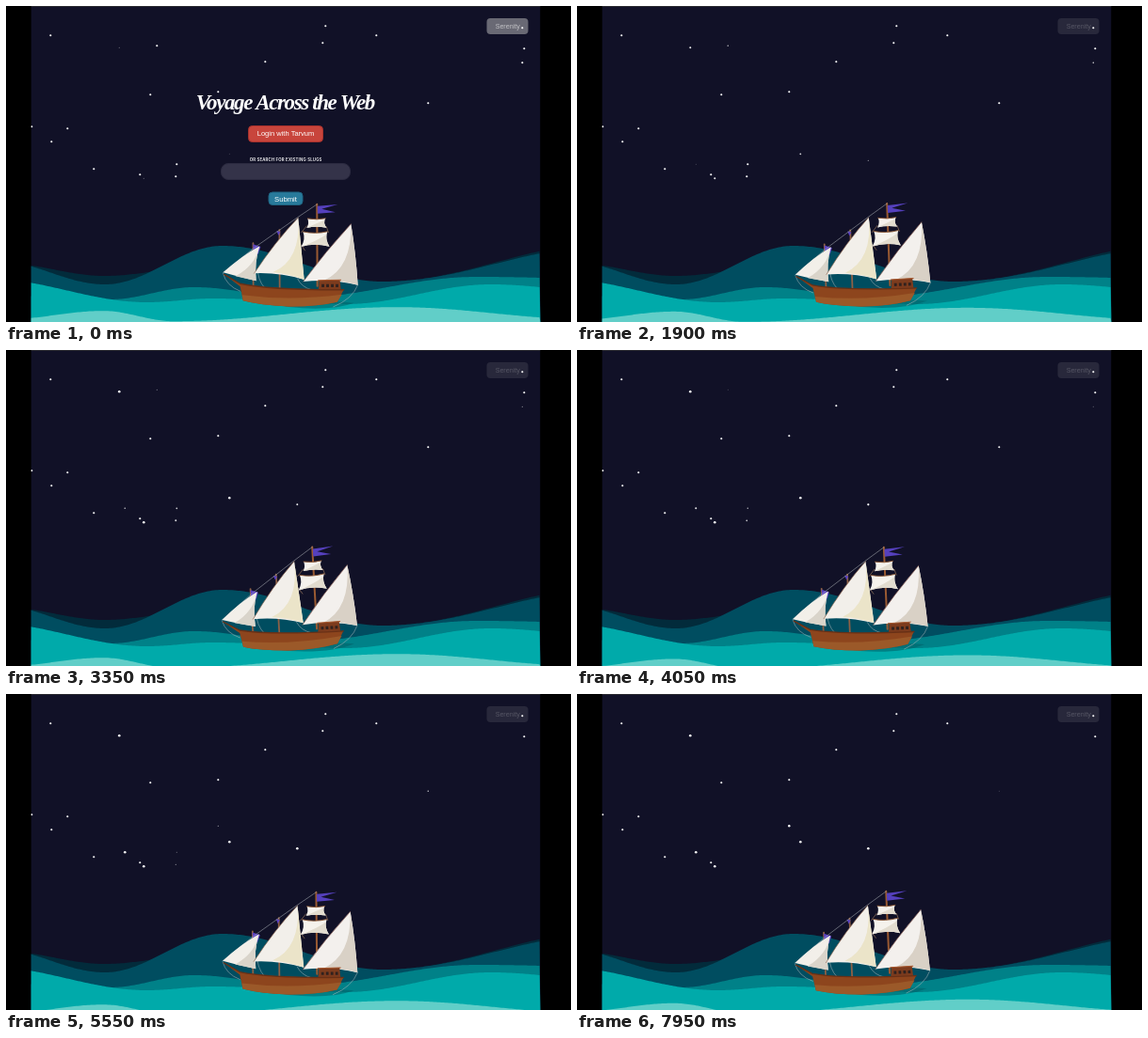
An HTML page with a canvas for the animation above (8 s loop, 600 by 336 pixels).

```html
<!DOCTYPE html>
<html lang="en">
<head>
<meta charset="utf-8">
<title>Voyage Across the Web</title>
<style>
  html, body { margin: 0; width: 100%; height: 100%; overflow: hidden; background: #000; }
  canvas { display: block; width: 600px; height: 336px; }
</style>
</head>
<body>
<canvas id="stage" width="600" height="336"></canvas>
<script>
const ctx = document.getElementById('stage').getContext('2d');
const LOOP = 8000;
const LEFT = 26.5, RIGHT = 567.5, H = 336;
const SANS = '"Liberation Sans", Arial, sans-serif';

const STEADY = [[47, 31], [339, 21], [336, 39], [393, 31], [275, 59], [153, 94], [225, 91],
  [550, 45], [548, 23], [27, 128], [65, 130], [48, 144], [93, 173], [142, 179]];
// Stars that grow or shrink carry the time at which they start or end.
const WAXING = [[120, 44, -900], [146, 183, -900], [237, 157, -500], [309, 164, 600],
  [126, 168, 1300], [225, 140, 4200]];
const WANING = [[160, 42, 5000], [548, 60, 5300], [181, 168, 7000], [180, 181, 7600], [448, 103, 8800]];

const clamp = u => Math.max(0, Math.min(1, u));
const ease = u => (1 - Math.cos(Math.PI * clamp(u))) / 2;

function fill(path, color) {
  ctx.fillStyle = color;
  ctx.fill(new Path2D(path));
}

function stroke(path, color, width) {
  ctx.strokeStyle = color;
  ctx.lineWidth = width;
  ctx.stroke(new Path2D(path));
}

// Water surface that swings from crest to trough along the given turning points.
function wave(color, turns, dy = 0) {
  ctx.beginPath();
  ctx.moveTo(LEFT, H);
  let i = 0;
  for (let x = LEFT; x <= RIGHT; x += 2) {
    while (x > turns[i + 1][0]) i++;
    const [x0, y0] = turns[i], [x1, y1] = turns[i + 1];
    ctx.lineTo(x, y0 + (y1 - y0) * ease((x - x0) / (x1 - x0)) + dy);
  }
  ctx.lineTo(RIGHT, H);
  ctx.fillStyle = color;
  ctx.fill();
}

function box(x, y, w, h, r, color, border) {
  ctx.beginPath();
  ctx.roundRect(x, y, w, h, r);
  ctx.fillStyle = color;
  ctx.fill();
  if (!border) return;
  ctx.strokeStyle = border;
  ctx.lineWidth = 1;
  ctx.stroke();
}

function label(text, x, y, font, color = '#fff', spacing = 0) {
  ctx.font = font;
  ctx.letterSpacing = spacing + 'px';
  ctx.fillStyle = color;
  ctx.fillText(text, x + spacing / 2, y);
}

function star(x, y, level = 1) {
  if (level <= 0) return;
  ctx.beginPath();
  ctx.arc(x + 0.3, y + 0.3, 0.35 + 0.7 * level, 0, Math.PI * 2);
  ctx.fillStyle = `rgba(255,255,255,${Math.min(1, 0.2 + 0.8 * level)})`;
  ctx.fill();
}

function drawStars(t) {
  for (const [x, y] of STEADY) star(x, y);
  for (const [x, y, start] of WAXING) star(x, y, 1.3 * clamp((t - start) / 4000));
  for (const [x, y, end] of WANING) star(x, y, clamp((end - t) / 5000));
}

function drawSea() {
  wave('#022b3b', [[0, 274], [105, 287], [190, 280], [400, 293], [640, 252]]);
  wave('#004d60', [[-10, 271], [105, 296], [230, 255], [400, 293], [640, 255]]);
  wave('#008188', [[0, 308], [110, 312], [200, 299], [310, 310], [500, 288], [640, 290]]);
  wave('#00aaaa', [[-20, 290], [150, 315], [220, 311], [360, 317], [515, 296], [640, 304]]);
}

function drawFoam(t) {
  const drop = 6.4 * (1 - Math.cos(Math.PI * (t - 600) / 5500)) / 2;
  wave('#61cec8', [[0, 333], [103, 324], [178, 335], [415, 320], [620, 333]], drop);
}

// Quick heel to port, slower return; the hull slides a little with each.
function sway(t) {
  const period = 5900, out = 2065;
  const p = (t - 700 + period) % period;
  const heeling = p < out;
  const u = heeling ? p / out : (p - out) / (period - out);
  const slide = Math.sin(Math.PI * u) ** 2;
  return {
    roll: -3.4 * (heeling ? ease(u) : 1 - ease(u)),
    drift: slide * (heeling ? 2 : -1)
  };
}

function drawShip(t) {
  const { roll, drift } = sway(t);
  ctx.save();
  ctx.translate(302 + drift, 310);
  ctx.rotate(roll * Math.PI / 180);
  ctx.translate(-302, -310);
  ctx.lineCap = 'round';

  fill('M290 318Q330 311 370 316Q345 325 300 320Z', 'rgba(0,100,108,.6)');

  // masts and pennants
  stroke('M331 211V298', '#9a5a32', 2);
  stroke('M291 238V302M263 252V302', '#8d6046', 1.8);
  fill('M331.5 213L353 211.3L336 216L350.5 219.6L331.5 221Z', '#5540bd');
  fill('M263 253L271 256L268 264L263 262Z', '#5a40c4');
  fill('M288 239L292 240L290 244Z', '#5a40c4');

  // rigging
  const rope = 'rgba(174,179,184,.75)';
  stroke('M331 211L310 225L264 257L231 283', rope, 0.7);
  stroke('M231 284Q234 297 249 303M268 284Q270 297 279 303M310 290Q314 299 325 302', rope, 0.7);
  stroke('M374 297Q368 312 348 320', rope, 0.7);
  stroke('M320 234L314 241M341 235L343 241M314 254L318 260', '#94745c', 0.7);

  // jib
  fill('M270 255Q251 265 231 283Q248 288 266 292Q264 272 270 255Z', '#f2efe9');
  fill('M270 255Q265 276 244 287L266 292Q264 272 270 255Z', '#d9d4ca');

  // stern sail
  fill('M367 232Q340 261 316 293Q346 290 374 297Q372 263 367 232Z', '#f3f0ed');
  fill('M367 232Q368 279 338 292Q357 292 374 297Q372 263 367 232Z', '#d9d1c6');
  stroke('M367 232Q340 261 316 293', '#7b5149', 0.7);

  // square sails
  fill('M321 226Q331 228 340 226Q337 231 341 236Q330 234 320 236Q323 231 321 226Z', '#f5f2ec');
  fill('M316 240Q329 243 342 240Q339 248 344 256Q328 252 314 256Q319 248 316 240Z', '#f5f2ec');
  fill('M320 236Q331 231 339 228Q338 232 341 236Q330 234 320 236Z', '#e2dccf');
  fill('M314 256Q331 250 341 243Q340 249 344 256Q328 252 314 256Z', '#e2dccf');
  stroke('M321 226Q331 228 340 226M316 240Q329 243 342 240', '#84512f', 0.9);

  // main sail
  fill('M311 225Q286 251 264 284Q291 283 317 291Q314 257 311 225Z', '#f2efea');
  fill('M311 225Q314 270 284 283Q301 285 317 291Q314 257 311 225Z', '#ebe4c9');
  stroke('M311 225Q286 251 264 284', '#916a54', 0.7);

  // hull
  fill('M333 292L355 291.5L356 303H332Z', '#7c3b1d');
  stroke('M332 292L356 291.5', '#a5542a', 1);
  fill('M232 285L249 295Q280 302 359 302L352 315Q330 320 300 319.5Q270 318 252 313L249 298Z', '#8d451d');
  fill('M251 307Q302 314 357 307L352 315Q330 320 300 319.5Q270 318 252 313Z', '#9b5929');
  stroke('M232 285L249 295Q280 302 359 302', '#693016', 1.3);
  ctx.fillStyle = '#30211e';
  for (let i = 0; i < 4; i++) ctx.fillRect(335.5 + i * 5, 296, 2.8, 3.2);
  ctx.restore();
}

function drawPanel(alpha) {
  if (alpha <= 0) return;
  ctx.save();
  ctx.globalAlpha = alpha;
  label('Voyage Across the Web', 297, 110, 'italic bold 23px "Liberation Serif", serif', '#fff', -1.4);
  box(257.5, 127.5, 79, 17, 4, '#c8453c', '#a9322d');
  label('Login with Tarvum', 297, 138.3, `7.5px ${SANS}`);
  label('OR SEARCH FOR EXISTING SLUGS', 297, 164.5, '600 4.3px Inter, sans-serif', '#fff', 0.2);
  box(228.5, 167.5, 137, 17, 7.5, '#343349', '#2b2a40');
  box(279, 198, 36, 13.5, 4, '#287a9b', '#1f6583');
  label('Submit', 297, 207.6, `7.7px ${SANS}`);
  ctx.restore();
}

function draw(t) {
  ctx.fillStyle = '#000';
  ctx.fillRect(0, 0, 600, H);
  ctx.save();
  ctx.beginPath();
  ctx.rect(LEFT, 0, RIGHT - LEFT, H);
  ctx.clip();
  ctx.fillStyle = '#111127';
  ctx.fillRect(LEFT, 0, RIGHT - LEFT, H);
  ctx.fillStyle = '#29292f';
  ctx.fillRect(LEFT, 0, RIGHT - LEFT, 1);

  const shown = 1 - ease(t / 550);
  ctx.textAlign = 'center';
  box(510.5, 13, 44, 17, 4, `rgba(200,200,200,${0.12 + 0.36 * shown})`);
  label('Serenity', 532.7, 24, `7.1px ${SANS}`, `rgba(255,255,255,${0.22 + 0.38 * shown})`);
  drawStars(t);
  drawSea();
  drawShip(t);
  drawFoam(t);
  drawPanel(shown);
  ctx.restore();
}

function frame() {
  draw(performance.now() % LOOP);
  requestAnimationFrame(frame);
}
frame();
</script>
</body>
</html>
```
